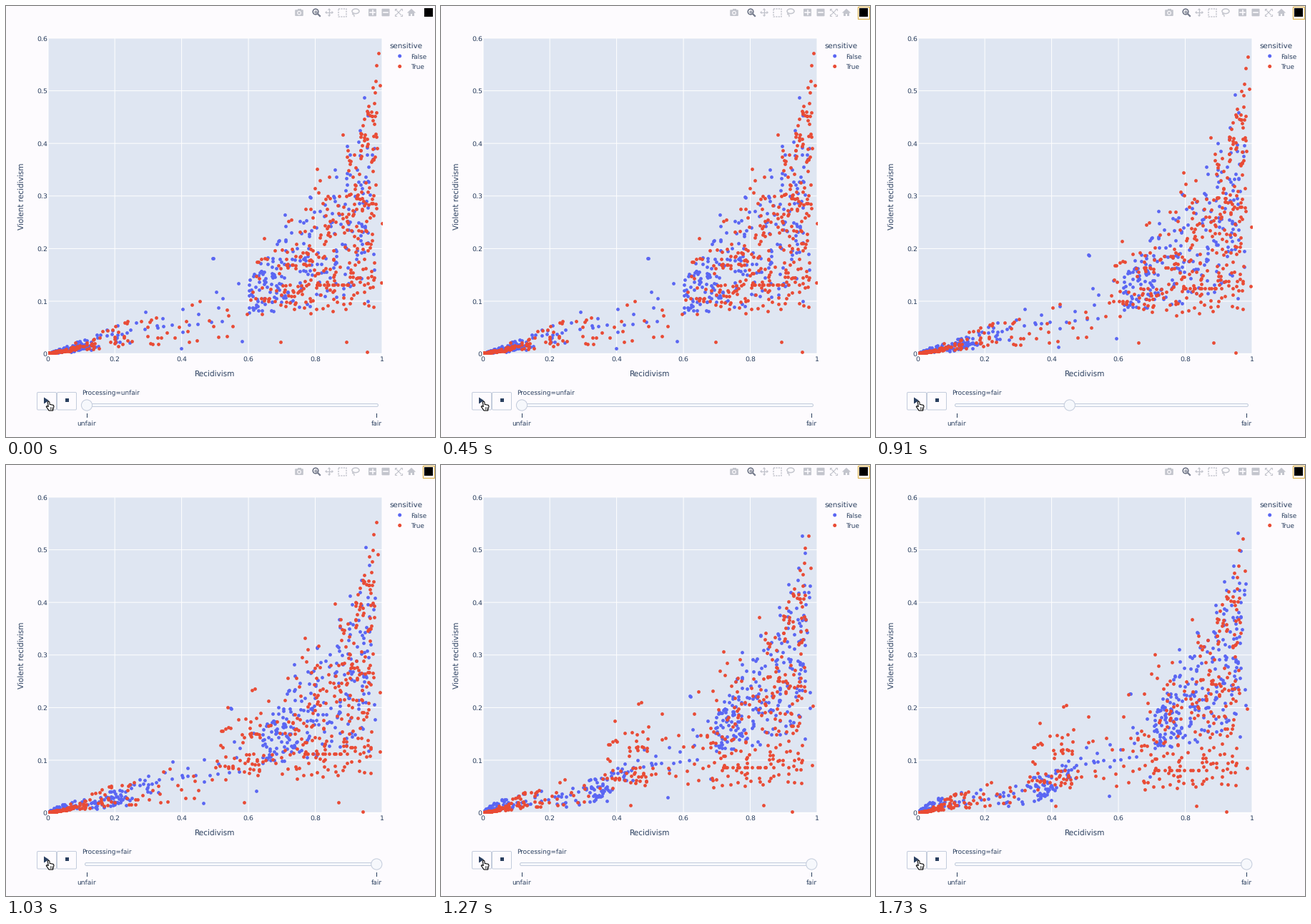
A matplotlib script for the animation above (1760 ms loop, 600 by 603 pixels).

```python
import numpy as np
import matplotlib.pyplot as plt
from matplotlib.animation import FuncAnimation
from matplotlib.patches import Circle, Ellipse, FancyBboxPatch, Polygon, Rectangle

W, H = 600, 603
LOOP, STEP = 1760, 10
PAPER, PLOT, INK = "#fdfbfe", "#dfe6f2", "#2a3f5f"
BLUE, RED = "#5a66f3", "#e94b35"
EDGE, ICON, ICON_ON = "#c3ccdc", "#c3c5cd", "#757b8c"
LEFT, RIGHT, TOP, BASE = 58.7, 526, 45, 486.6

plt.rcParams.update({"font.family": "DejaVu Sans", "text.hinting": "none"})
rng = np.random.default_rng(12)

# At 72 dpi one point is one pixel, so all sizes below are pixels.
fig = plt.figure(figsize=(W / 72, H / 72), dpi=72, facecolor=PAPER)
ax = fig.add_axes([0, 0, 1, 1])
ax.set(xlim=(0, W), ylim=(H, 0))
ax.axis("off")


def to_px(points):
    x, y = points.T
    return np.column_stack([LEFT + x * (RIGHT - LEFT), BASE - y * (BASE - TOP) / 0.6])


def text(x, y, s, size=9, **kw):
    return ax.text(x, y, s, size=size, color=INK, **kw)


def line(xs, ys, color=INK, lw=1.0, z=2, **kw):
    ax.plot(xs, ys, color=color, lw=lw, zorder=z, **kw)


def box(x, y, w, h, fc, ec="none", lw=1.0, z=1):
    return ax.add_patch(Rectangle((x, y), w, h, fc=fc, ec=ec, lw=lw, zorder=z))


def rounded(x, y, w, h, r, fc, ec="none"):
    ax.add_patch(FancyBboxPatch((x, y), w, h, fc=fc, ec=ec, lw=1,
                                boxstyle=f"round,pad=0,rounding_size={r}"))


def poly(points, fc, ec="none", lw=1.0, z=1):
    ax.add_patch(Polygon(points, fc=fc, ec=ec, lw=lw, zorder=z, joinstyle="round"))


def disc(x, y, r, fc, ec="none", z=1):
    return ax.add_patch(Circle((x, y), r, fc=fc, ec=ec, lw=1, zorder=z))


# ---- starting positions ----

def ceiling(x):
    """Upper edge of the cloud: a straight ramp that shoots up near x = 1."""
    return .14 + .8 * (x - .57) + .06 * (x / .975) ** 40


def wedge(x, a, b):
    floor = .07
    return np.column_stack([x, floor + (ceiling(x) - floor) * rng.beta(a, b, x.size)])


def ray(x, lo, hi):
    return np.column_stack([x, x * rng.uniform(lo, hi, x.size) + .001])


blue_from = np.vstack([
    [(.492, .182), (.495, .181), (.58, .024), (.398, .01), (.71, .265), (.947, .487)],
    wedge(rng.uniform(.6, .978, 235), 1.9, 1.9),
    ray(.13 * rng.random(110) ** 1.1, .04, .25),
    ray(rng.uniform(.1, .3, 26), .08, .28),
    ray(rng.uniform(.3, .57, 16), .1, .24)])
red_from = np.vstack([
    [(.99, .571), (.994, .51), (.806, .351), (.883, .417), (.72, .252), (.646, .22),
     (.999, .248), (.998, .135), (.955, .003), (.893, .023), (.697, .023)],
    wedge(.58 + .398 * rng.random(270) ** .62, 1.4, 1.9),
    wedge(rng.uniform(.935, .986, 50), 3, 1.3),
    np.column_stack([rng.uniform(.8, .93, 16), np.full(16, .131)]),
    ray(rng.exponential(.033, 170), .06, .16),
    ray(rng.uniform(.08, .25, 34), .06, .26),
    ray(rng.uniform(.25, .58, 28), .05, .22)])


# ---- end positions ----

def gate(x, mid, width):
    return 1 / (1 + np.exp((mid - x) / width))


def raise_blue(points):
    x, y = points.T
    dx = .32 * np.clip(1 - x, 0, 1) ** 1.2 * gate(x, .06, .012)
    return np.column_stack([x + dx, y + np.minimum(2.2 * y, .045)])


def lower_red(points):
    x, y = points.T
    far = .285 * np.sin(np.pi / 2 * np.minimum(x / .7, 1)) ** 1.2
    near = .013 + .43 * (1 - x)
    dx = far + (near - far) * gate(x, .762, .006)
    return np.column_stack([x - dx, y - np.minimum(.42 * y, .05)])


blue_to, red_to = raise_blue(blue_from), lower_red(red_from)

# ---- plot area ----
area = box(LEFT, TOP, RIGHT - LEFT, BASE - TOP, PLOT, z=0)
for i in range(6):
    x = LEFT + i * (RIGHT - LEFT) / 5
    line([x, x], [TOP, BASE], "white", 1 if i else 1.6, .5, snap=False)
    text(x, 497, f"{i / 5:g}", 9.4, ha="center")
for i in range(7):
    y = BASE - i * (BASE - TOP) / 6
    line([LEFT, RIGHT], [y, y], "white", 1 if i else 1.6, .5, snap=False)
    text(57.8, y + 3.4, f"{i / 10:g}", 9.4, ha="right")
text(292.5, 517.8, "Recidivism", 10.5, ha="center")
text(21.5, 266, "Violent recidivism", 10.5, rotation=90, ha="center", va="center")

text(536.5, 58.8, "sensitive", 10.4)
for y, color, name in [(70, BLUE, "False"), (84.5, RED, "True")]:
    disc(550.7, y, 2.5, color)
    text(565.7, y + 3.4, name, 8.9)


def dots(points, color, z):
    sc = ax.scatter(*to_px(points).T, s=23, c=color, linewidths=0, zorder=z)
    sc.set_clip_path(area)
    return sc


blue_dots = dots(blue_from, BLUE, 2)
red_dots = dots(red_from, RED, 2.1)

# ---- buttons and slider ----
for x in (43.5, 71.5):
    rounded(x, 540.5, 27, 24.5, 1.5, PAPER, EDGE)
poly([(53, 547.5), (53, 556.5), (60, 552)], INK)
box(82.6, 549.4, 5, 5, INK)
rounded(110.5, 556.5, 410, 4, 2, "#f6f8fc", EDGE)
for x, name in [(113, "unfair"), (518.3, "fair")]:
    line([x, x], [570, 575])
    text(x, 587, name, 9.1, ha="center")
label = text(105.8, 544.3, "Processing=unfair", 8.9)
knob = disc(113, 558.5, 7.6, "#f6f8fc", EDGE, z=3)

# ---- hand cursor ----
poly([(58.3, 554), (59.5, 553), (60.8, 554), (61.2, 557.4), (66.2, 558.4),
      (67, 560), (65.6, 566), (60, 566), (56.3, 560.6), (57.2, 559.5),
      (59.2, 560.6)], "white", "black", 1.1, 4)
for x in (62, 63.8):
    line([x, x], [561.3, 564], "black", .7, 4.1)


# ---- toolbar ----
def ring(x, y, w, h, color, lw):
    ax.add_patch(Ellipse((x, y), w, h, fc="none", ec=color, lw=lw))


rounded(404.2, 5.3, 11.6, 8.7, 1, ICON)
box(407.5, 4, 5, 2, ICON)
disc(410, 9.7, 2.9, PAPER)
disc(410, 9.7, 1.7, ICON)

ring(433, 8, 7.6, 7.6, ICON_ON, 1.7)
line([436, 439], [11, 14], ICON_ON, 2.2)
line([431.2, 434.8], [8, 8], ICON_ON)
line([433, 433], [6.2, 9.8], ICON_ON)

for dx, dy in [(1, 0), (-1, 0), (0, 1), (0, -1)]:
    mid, out, side = np.array([452, 9]), np.array([dx, dy]), np.array([dy, dx])
    line(*np.transpose([mid, mid + 4 * out]), ICON, 1.3)
    poly([mid + 6 * out, mid + 3.4 * out + 2.2 * side, mid + 3.4 * out - 2.2 * side], ICON)

line([465, 475.5, 475.5, 465, 465], [4, 4, 14.5, 14.5, 4], ICON, 1.5, ls=(0, (1.4, .9)))

ring(489, 7.3, 10, 6.6, ICON, 1.5)
line([485.2, 484.6, 486.6, 487], [9.8, 11.5, 12, 14.5], ICON, 1.3)

for x in (512.5, 531):
    rounded(x - 5.5, 3.8, 11, 10.5, 1, ICON)
    line([x - 3.3, x + 3.3], [9, 9], PAPER, 1.6)
line([512.5, 512.5], [5.7, 12.3], PAPER, 1.6)

for sx in (-1, 1):
    for sy in (-1, 1):
        cx, cy = 549 + 5.4 * sx, 9 + 5.4 * sy
        line([cx - 2.6 * sx, cx, cx], [cy, cy, cy - 2.6 * sy], ICON, 1.1)
        line([549, 549 + 3.6 * sx], [9, 9 + 3.6 * sy], ICON, 1.1)

poly([(560.8, 9.6), (567, 3.8), (573.2, 9.6)], ICON)
for x in (562.6, 568.2):
    box(x, 8, 3.2, 6.2, ICON)
box(565, 8, 4, 2.6, ICON)

box(585, 3, 12, 12, "black")
focus = box(582.5, .5, 16.5, 17, "none", "#dcb24c", 1.2)


# ---- motion ----
def held(t):
    """Time of the picture on screen: 30 ms steps with one longer hold at 450 ms."""
    if t < 450:
        return t // 30 * 30
    return 450 if t < 520 else 520 + (t - 520) // 30 * 30


def cubic(u):
    return 4 * u ** 3 if u < .5 else 1 - 4 * (1 - u) ** 3


def draw(i):
    t = held(i * STEP)
    p = np.clip((t - 850) / 470, 0, 1)
    blue_dots.set_offsets(to_px(blue_from + (blue_to - blue_from) * p))
    red_dots.set_offsets(to_px(red_from + (red_to - red_from) * p))
    slide = cubic(np.clip((t - 841) / 150, 0, 1))
    knob.center = (113 + 405.3 * slide, 558.5)
    label.set_text("Processing=" + ("fair" if t >= 850 else "unfair"))
    focus.set_visible(t >= 30)
    return blue_dots, red_dots, knob, label, focus


anim = FuncAnimation(fig, draw, frames=LOOP // STEP, interval=STEP,
                     repeat=True, repeat_delay=0)
plt.show()
```
